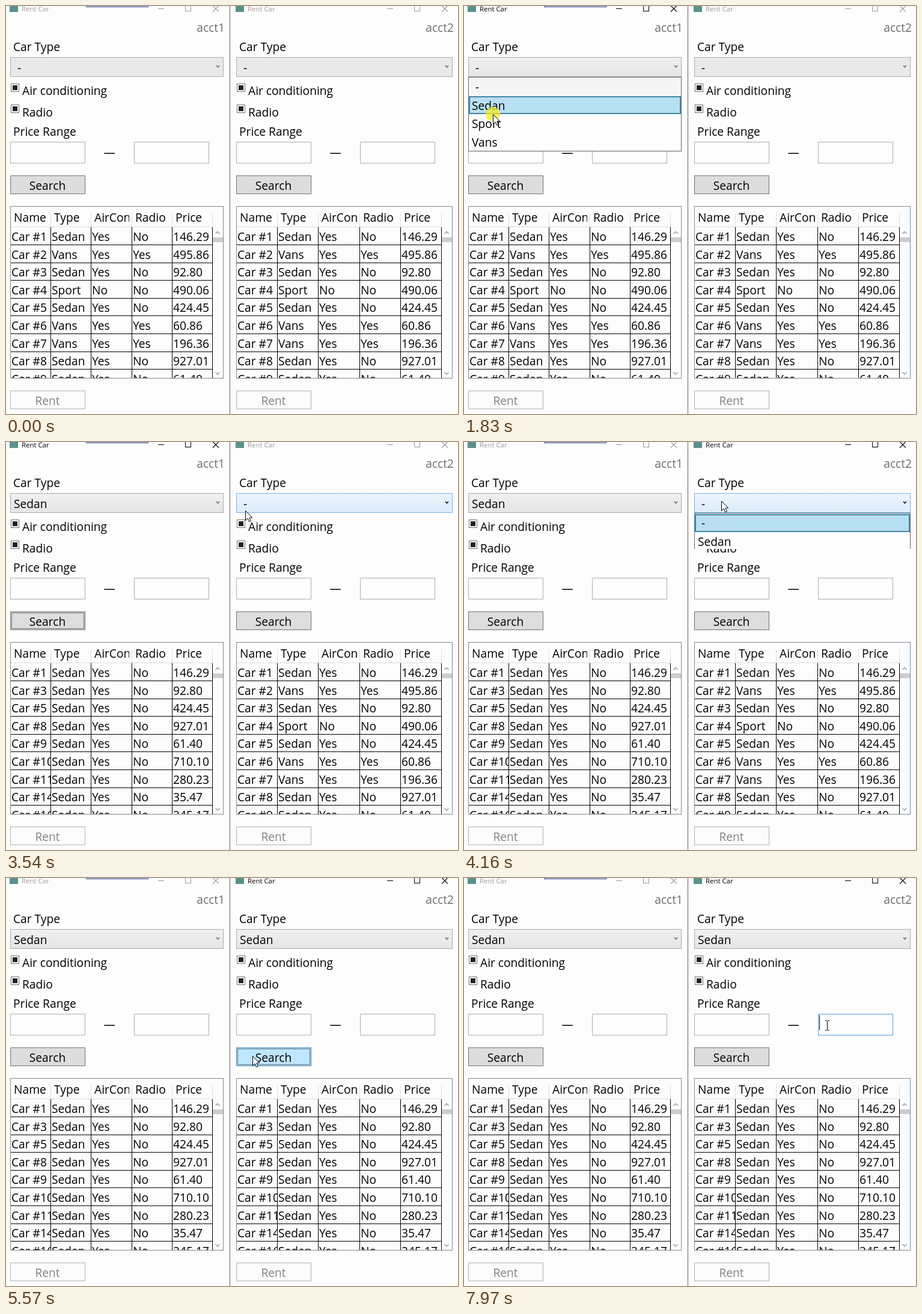
Recreate the animation shown at these times as an HTML page. Size 752 by 679 pixels, loop 8000 ms.

```html
<!DOCTYPE html>
<html lang="en">
<head>
<meta charset="utf-8">
<title>Rent Car</title>
<style>
  html, body { margin: 0; width: 100%; height: 100%; overflow: hidden; background: #fdfdfd; }
  svg { display: block; }
  text { font-family: "Open Sans", "Noto Sans", sans-serif; font-size: 19.2px; white-space: pre; }
  .title { font-size: 11.4px; }
</style>
</head>
<body>
<svg id="stage" width="752" height="679" viewBox="0 0 752 679">
  <defs>
    <linearGradient id="plain" x2="0" y2="1"><stop stop-color="#f0f0f0"/><stop offset="1" stop-color="#e5e5e5"/></linearGradient>
    <linearGradient id="hover" x2="0" y2="1"><stop stop-color="#ecf4fc"/><stop offset="1" stop-color="#dcecfc"/></linearGradient>
  </defs>
  <g id="scene"></g>
</svg>
<script>
const LOOP = 8000, STEP = 76;
const TYPES = ['-', 'Sedan', 'Sport', 'Vans'];
const HEADERS = ['Name', 'Type', 'AirCon', 'Radio', 'Price'];
const CARS = [
  '1 Sedan Yes No 146.29', '2 Vans Yes Yes 495.86', '3 Sedan Yes No 92.80',
  '4 Sport No No 490.06', '5 Sedan Yes No 424.45', '6 Vans Yes Yes 60.86',
  '7 Vans Yes Yes 196.36', '8 Sedan Yes No 927.01', '9 Sedan Yes No 61.40',
  '10 Sedan Yes No 710.10', '11 Sedan Yes No 280.23', '14 Sedan Yes No 35.47',
  '16 Sedan Yes No 245.17'
].map(row => ('Car_#' + row).split(' ').map(s => s.replace('_', ' ')));

// Pointer moves: start time, number of steps, end point
const START = [619, 732];
const MOVES = [
  [280, 9, 51, 94], [1220, 5, 48, 180], [1900, 2, 50, 164], [2150, 3, 58, 293],
  [3310, 4, 398, 114], [3620, 3, 428, 98], [4250, 6, 434, 163], [4710, 3, 428, 248],
  [4940, 4, 410, 296], [6420, 1, 408, 296], [6590, 4, 420, 263], [6970, 5, 582, 247],
  [7430, 2, 604, 245]
];
const CLICKS = [[970, 1220], [1830, 1980], [2450, 2670], [3850, 4160], [4640, 4780], [5340, 5560], [7890, 7965]];

const WINDOWS = [
  { x: 7, w: 354, col: 67.25, user: 'acct1', active: [970, 3850], open: [1140, 1900], press: [2450, 2530],
    found: 2530, ring: [2450, 3850] },
  { x: 383, w: 359, col: 68.25, user: 'acct2', active: [3850, LOOP], open: [4090, 4710], press: [5340, 5420],
    found: 5420, ring: [5340, 7890], typing: 7890 }
];

const during = (t, [a, b]) => t >= a && t < b;
const inside = (p, x, y, w, h) => p[0] >= x && p[0] < x + w && p[1] >= y && p[1] < y + h;
const fill = (x, y, w, h, color) => `<rect x="${x}" y="${y}" width="${w}" height="${h}" fill="${color}"/>`;
const box = (x, y, w, h, color, line, extra = '') =>
  `<rect x="${x + .5}" y="${y + .5}" width="${w - 1}" height="${h - 1}" fill="${color}" stroke="${line}" ${extra}/>`;
const label = (x, y, s, color = '#000', extra = '') => `<text x="${x}" y="${y}" fill="${color}" ${extra}>${s}</text>`;
const stroke = (d, color, width = 1) => `<path d="${d}" fill="none" stroke="${color}" stroke-width="${width}"/>`;
const dotted = (x, y, w, h) => box(x, y, w, h, 'none', '#000', 'stroke-dasharray="1 1"');
const clip = (x, y, w, h, body) =>
  `<svg x="${x}" y="${y}" width="${w}" height="${h}" viewBox="${x} ${y} ${w} ${h}" overflow="hidden">${body}</svg>`;

function pointerAt(t) {
  let p = START;
  for (const [t0, n, x, y] of MOVES) {
    if (t < t0) break;
    const f = Math.min(n, Math.floor((t - t0) / STEP) + 1) / n;
    p = [p[0] + (x - p[0]) * f, p[1] + (y - p[1]) * f];
  }
  return p.map(Math.round);
}

function titleBar(win, t) {
  const { x, w } = win, ink = during(t, win.active) ? '#000' : '#999', end = x + w;
  return fill(x - 1, 0, 14, 10, '#5b918c')
    + label(x + 19, 9, 'Rent Car', ink, 'class="title"')
    + stroke(`M${end - 108} 4.5h10`, ink)
    + box(end - 63, -1, 10, 10, 'none', ink)
    + stroke(`M${end - 17} -.5l10 10m0 -10l-10 10`, ink, 1.1)
    + label(end + 3, 43, win.user, '#6d6d6d', 'text-anchor="end"');
}

function combo(win, t, p) {
  const { x, w } = win, hot = inside(p, x, 85, w, 33);
  const back = hot ? 'url(#hover)' : t < win.open[0] ? '#e9e9e9' : 'url(#plain)';
  const chosen = t >= win.open[1];
  return box(x, 85, w + 1, 33, back, hot ? '#7eb4ea' : '#acacac')
    + label(x + (chosen ? 6 : 12), 110, TYPES[+chosen])
    + stroke(`M${x + w - 11} 99l2.5 3 2.5 -3`, hot ? '#000' : '#606060', 1.3);
}

function popup(win, t, p) {
  if (!during(t, win.open)) return '';
  const { x, w } = win, [t0] = win.open;
  const picked = Math.max(0, Math.min(3, Math.floor((p[1] - 120) / 30.4)));
  let body = box(x, 118, w + 1, 124, '#fdfdfd', '#646464');
  if (picked) body += fill(x + 1, 119, w - 1, 31, '#f5f5f5');
  const y = 120 + Math.round(picked * 30.3);
  body += box(x + 1, y, w - 1, 30, '#b8e0f2', '#26a0da') + dotted(x + 2, y + 1, w - 3, 28);
  TYPES.forEach((s, i) => body += label(x + (i ? 6 : 12), 142 + Math.round(i * 30.7), s));
  const shown = t < t0 + STEP ? 60 : 125;
  return clip(x, 118, w + 1, shown, body);
}

function checkBox(x, y, s) {
  return box(x + 1, y, 14, 14, '#fff', '#707070') + fill(x + 4, y + 3, 8, 8, '#212121') + label(x + 20, y + 19, s);
}

function field(x, p, focused) {
  const line = focused ? '#569de5' : inside(p, x, 226, 125, 36) ? '#7eb4ea' : '#abadb3';
  return box(x, 226, 125, 36, '#fdfdfd', line) + (focused ? fill(x + 2, 228, 1, 25, '#000') : '');
}

function searchButton(win, t, p) {
  const { x } = win, hot = inside(p, x, 282, 125, 31), down = during(t, win.press);
  const [back, line] = down ? ['#c4e5f6', '#2c628b'] : hot ? ['#bee6fd', '#3c7fb1'] : ['#ddd', '#707070'];
  return box(x, 282, 125, 31, back, line)
    + label(x + 62, 306, 'Search', '#000', 'text-anchor="middle"')
    + (during(t, win.ring) ? dotted(x + 2, 284, 121, 27) : '');
}

function table(win, t) {
  const { x, w, col } = win, end = x + w;
  const edges = [0, 1, 2, 3, 4, 5].map(i => Math.floor(x + i * col + .25));
  const right = edges[5];
  const cars = (t >= win.found ? CARS.filter(c => c[1] === 'Sedan') : CARS).slice(0, 9);
  let out = fill(x, 333, w + 1, 287, '#fdfdfd') + stroke(`M${x + 1} 367.5H${right}`, '#dcdcdc');
  HEADERS.forEach((s, i) => {
    out += clip(edges[i], 340, edges[i + 1] - edges[i] - 4, 27, label(edges[i] + 6, 359, s))
      + stroke(`M${edges[i + 1] + .5} 345V367`, '#dedede');
  });
  let rows = '';
  cars.forEach((car, r) => {
    const y = 368 + r * 29.6, line = Math.round(397 + r * 29.6) + .5;
    car.forEach((s, i) => rows += clip(edges[i], y, edges[i + 1] - edges[i], 30, label(edges[i] + 2, Math.round(y + 23), s)));
    rows += stroke(`M${x + 1} ${line}H${right}`, '#000');
  });
  edges.slice(1).forEach(e => rows += stroke(`M${e + .5} 368V619`, '#000'));
  out += clip(x, 368, w, 251, rows);
  out += fill(end - 17, 385, 17, 8, '#cdcdcd')
    + stroke(`M${end - 12.5} 379l3.5 -3.5 3.5 3.5M${end - 12.5} 609.5l3.5 3.5 3.5 -3.5`, '#9a9a9a', 1.4);
  return out + box(x, 333, w + 1, 287, 'none', '#828790') + (win.typing ? fill(end, 333, 1, 287, '#688caf') : '');
}

function panel(win, t, p) {
  const { x } = win;
  return titleBar(win, t)
    + label(x + 5, 75, 'Car Type') + combo(win, t, p)
    + checkBox(x, 129, 'Air conditioning') + checkBox(x, 164, 'Radio').replace('y="183"', 'y="184"')
    + label(x + 5, 216, 'Price Range')
    + field(x, p) + label(x + 155.5, 251, '—') + field(x + 206, p, t >= win.typing)
    + searchButton(win, t, p) + table(win, t)
    + box(x, 640, 125, 31, '#fbfbfb', '#adb2b5')
    + label(x + 62, 664, 'Rent', '#838383', 'text-anchor="middle"')
    + popup(win, t, p);
}

function pointer(t, p) {
  if (t < MOVES[0][0]) return '';
  const [x, y] = p;
  const beam = [7, 213, 383, 589].some(fx => inside(p, fx, 226, 125, 36));
  const halo = CLICKS.some(c => during(t, c))
    ? `<circle cx="${x}" cy="${y}" r="12" fill="#f3eb2c" opacity=".76"/>` : '';
  const shape = beam
    ? stroke(`M${x - 3} ${y - 7.5}h2.5l1 1 1 -1h2.5M${x + .5} ${y - 7}v15M${x - 3} ${y + 8.5}h2.5l1 -1 1 1h2.5`, '#000')
    : `<path transform="translate(${x + .5} ${y})" d="M0 .5V16.5L3.7 13 6.2 18.6 8.8 17.5 6.4 11.9H11.2Z" fill="#fff" stroke="#000"/>`;
  return halo + shape;
}

function scene(t) {
  const p = pointerAt(t);
  return box(133, -4, 104, 6, '#d9dce6', '#39488f')
    + WINDOWS.map(win => panel(win, t, p)).join('')
    + fill(372, 0, 1, 679, '#636363')
    + pointer(t, p);
}

const root = document.getElementById('scene');
let last = '';
function draw(now) {
  const markup = scene(now % LOOP);
  if (markup !== last) root.innerHTML = last = markup;
}
const begin = performance.now();
function tick() {
  draw(performance.now() - begin);
  requestAnimationFrame(tick);
}
tick();
</script>
</body>
</html>
```
